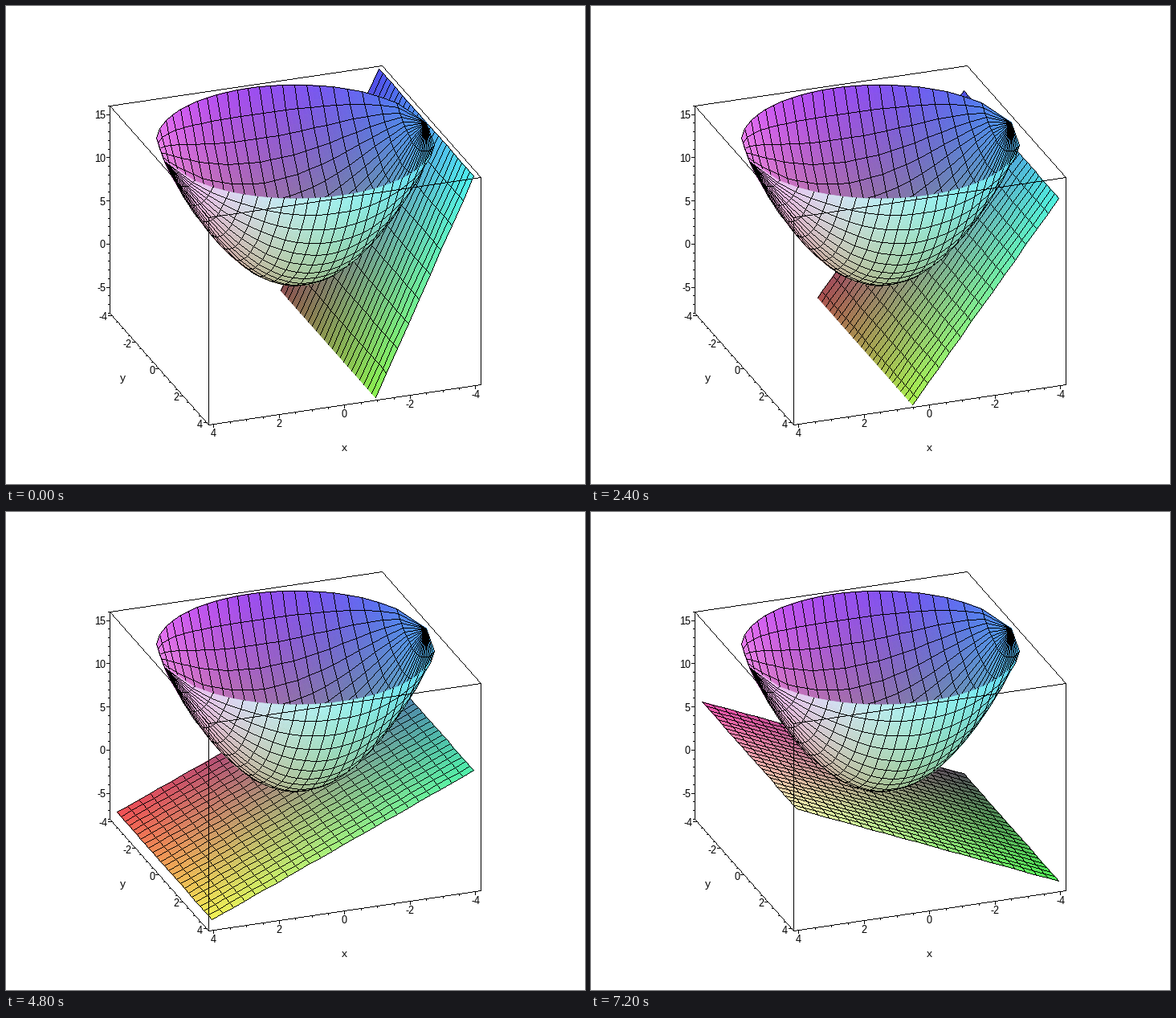
A matplotlib script that plays this animation: 721 px wide and 595 px high, repeating every 8 s.

```python
import numpy as np
import matplotlib.pyplot as plt
from matplotlib.animation import FuncAnimation
from matplotlib.collections import PolyCollection

W, H, DPI = 721, 595, 128
PX = 72 / DPI                 # one pixel in points
FRAMES, INTERVAL = 10, 800
R, BOX = 4, 4.16              # surface range and half width of the axes box
Z_LOW, Z_HIGH = -8, 16
GRID = np.linspace(-R, R, 25)
EXTENT = (-0.5, W - 0.5, H - 0.5, -0.5)

plt.rcParams.update({"font.family": "Liberation Sans", "text.hinting": "native",
                     "text.hinting_factor": 1})
fig = plt.figure(figsize=(W / DPI, H / DPI), dpi=DPI, facecolor="white")
ax = fig.add_axes([0, 0, 1, 1])
ax.set_xlim(EXTENT[:2])
ax.set_ylim(EXTENT[2:])
ax.axis("off")


def project(p):
    """Orthographic view of points (..., 3) in stage pixels."""
    x, y, z = np.moveaxis(np.asarray(p, float), -1, 0)
    return np.stack([360 - 40.75 * x + 14.78 * y,
                     340.5 + 6 * x + 16.7 * y - 10.75 * z], axis=-1)


def shade(p):
    """Colour by position: x is red, y is green, z is blue."""
    low = np.array([-R, -R, Z_LOW])
    high = np.array([R, R, Z_HIGH])
    return 0.3 + 0.65 * np.clip((p - low) / (high - low), 0, 1)


def quads(grid):
    """Cells of a point grid as (n, 4, 3)."""
    cells = np.stack([grid[:-1, :-1], grid[1:, :-1], grid[1:, 1:], grid[:-1, 1:]], axis=2)
    return cells.reshape(-1, 4, 3)


def split(cells, k=3):
    """Cut every cell into k by k parts for a smooth gradient."""
    u, v = np.meshgrid(np.linspace(0, 1, k + 1), np.linspace(0, 1, k + 1), indexing="ij")
    weights = np.stack([(1 - u) * (1 - v), u * (1 - v), u * v, (1 - u) * v], axis=-1)
    points = np.einsum("uvc,ncd->nuvd", weights, cells)
    return np.concatenate([quads(g) for g in points])


def hairlines(segs):
    """Transparent layer with hard black lines, one pixel wide."""
    segs = np.floor(np.asarray(segs, float) + 0.5)
    start, delta = segs[:, 0], segs[:, 1] - segs[:, 0]
    layer = np.zeros((H, W, 4), np.uint8)
    for p, d in zip(start, delta):
        n = int(np.abs(d).max())
        t = np.linspace(0, 1, n + 1)[:, None]
        x, y = np.floor(p + t * d + 0.5).astype(int).T
        layer[y, x, 3] = 255
    return layer


def add_lines(segs, zorder):
    return ax.imshow(hairlines(segs), extent=EXTENT, aspect="auto",
                     interpolation="nearest", zorder=zorder)


def add_faces(cells, zorder):
    parts = split(cells)
    faces = PolyCollection(project(parts), facecolors=shade(parts.mean(axis=1)),
                           edgecolors="face", linewidths=0.7 * PX, zorder=zorder)
    return ax.add_collection(faces, autolim=False)


def cell_edges(cells, with_rim=True):
    """Outlines of the cells, open where the floor (or the rim) cuts them."""
    edges = np.stack([cells, np.roll(cells, -1, axis=1)], axis=2).reshape(-1, 2, 3)
    z = edges[:, :, 2]
    keep = z.max(axis=1) > Z_LOW + 0.01
    if not with_rim:
        keep &= z.min(axis=1) < Z_HIGH - 0.01
    return project(edges[keep])


def draw_bowl():
    x, t = np.meshgrid(GRID, np.linspace(-1, 1, 25), indexing="ij")
    y = t * np.sqrt(R * R - x * x)
    cells = quads(np.stack([x, y, x * x + y * y], axis=-1))
    a, b, c, d = np.moveaxis(project(cells), 1, 0)
    p, q = c - a, d - b
    facing = p[:, 0] * q[:, 1] - p[:, 1] * q[:, 0]
    middle = 12 * 24 + 11     # a cell at the bottom, seen from inside
    inside = facing * np.sign(facing[middle]) > 0
    for mask, zorder, with_rim in ((inside, 4, True), (~inside, 6, False)):
        add_faces(cells[mask], zorder)
        add_lines(cell_edges(cells[mask], with_rim), zorder + 1)


def tangent_plane(a):
    """Cells of z = 2ax - a^2 above the floor of the box."""
    end = min(R, (a * a + Z_LOW) / (2 * a)) if a < 0 else R
    xs = np.append(GRID[GRID < end - 1e-6], end)
    x, y = np.meshgrid(xs, GRID, indexing="ij")
    return quads(np.stack([x, y, 2 * a * x - a * a], axis=-1))


def draw_box():
    def edge(*ends):
        return project([(BOX * sx, BOX * sy, z) for sx, sy, z in ends])

    lo, hi = Z_LOW, Z_HIGH
    add_lines([edge((1, -1, hi), (-1, -1, hi)), edge((-1, -1, hi), (-1, 1, hi))], 0)
    add_lines([edge((1, -1, hi), (1, 1, hi)), edge((1, 1, hi), (-1, 1, hi)),
               edge((1, -1, lo), (1, 1, lo)), edge((1, 1, lo), (-1, 1, lo)),
               edge((1, -1, lo), (1, -1, hi)), edge((1, 1, lo), (1, 1, hi)),
               edge((-1, 1, lo), (-1, 1, hi))], 9)


def label(x, y, text, align):
    ax.text(x, y, text, fontsize=13 * PX, ha=align, va="baseline", zorder=10)


def draw_axis(values, major, place, step, offset, align):
    """Ticks at each value, longer and labelled at multiples of major."""
    ticks = []
    for v in values:
        pos = project(place(v))
        big = abs(v / major - round(v / major)) < 1e-6
        ticks.append([pos, pos + np.array(step) * (4 if big else 2)])
        if big:
            label(*(pos + offset), f"{v:.0f}", align)
    add_lines(ticks, 9)


draw_box()
flat = np.arange(-8, 9) / 2
draw_axis(flat, 2, lambda v: (v, BOX, Z_LOW), (0, 1), (-0.5, 15.5), "center")
draw_axis(flat, 2, lambda v: (BOX, v, Z_LOW), (-1, 0), (-5, 6), "right")
draw_axis(np.arange(Z_LOW, Z_HIGH + 1), 5, lambda v: (BOX, -BOX, v), (-1, 0),
          (-5.5, 5), "right")
label(421, 553.5, "x", "center")
label(145, 466.5, "y", "center")
draw_bowl()

first = tangent_plane(-R)
plane_faces = add_faces(first, 2)
plane_lines = add_lines(cell_edges(first), 3)


def update(i):
    cells = tangent_plane(-R + 8 * i / 15)
    parts = split(cells)
    plane_faces.set_verts(project(parts))
    plane_faces.set_facecolor(shade(parts.mean(axis=1)))
    plane_lines.set_data(hairlines(cell_edges(cells)))
    return plane_faces, plane_lines


anim = FuncAnimation(fig, update, frames=FRAMES, interval=INTERVAL,
                     repeat=True, repeat_delay=0, blit=False)
plt.show()
```
